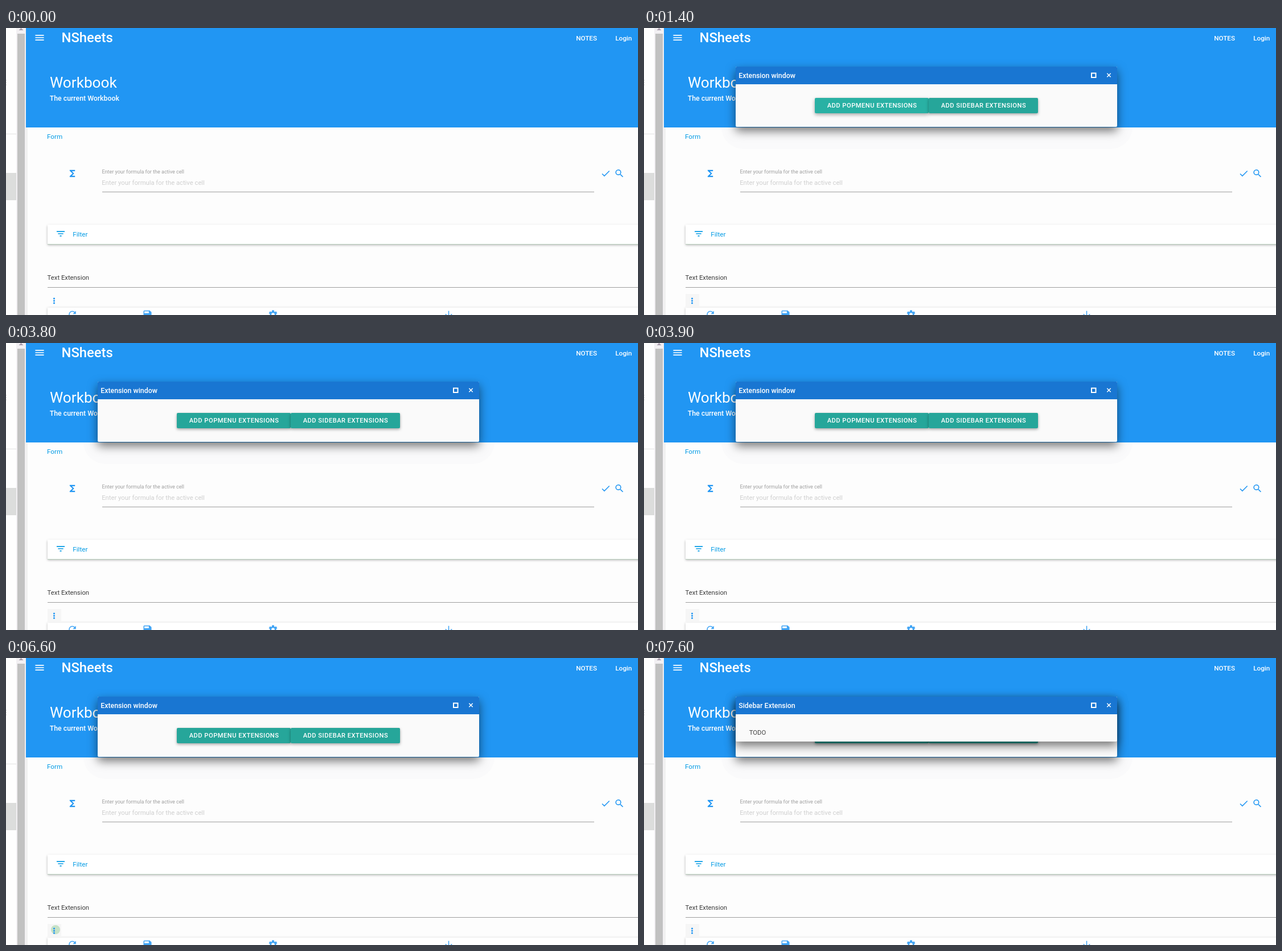
Animation of 1110 by 505 pixels, one loop 8000 ms. Source, as an HTML page with a canvas:

```html
<!DOCTYPE html>
<html lang="en">
<head>
<meta charset="utf-8">
<title>Workbook extensions</title>
<style>
html, body { margin: 0; width: 100%; height: 100%; overflow: hidden; background: #fdfdfd; }
canvas { display: block; }
</style>
</head>
<body>
<canvas id="stage" width="1110" height="505"></canvas>
<script>
const ctx = document.getElementById('stage').getContext('2d');
const LOOP = 8000;
const BLUE = '#2196f3', LIGHT_BLUE = '#42a5f5', LINK = '#039be5', WHITE = '#fff';

// Icon outlines on a 24 unit grid
const ICONS = {
  menu: 'M3 18h18v-2H3v2zm0-5h18v-2H3v2zm0-7v2h18V6H3z',
  sigma: 'M18 4H6v2l6.5 6L6 18v2h12v-3h-7l5-5-5-5h7z',
  check: 'M9 16.17L4.83 12l-1.42 1.41L9 19 21 7l-1.41-1.41z',
  search: 'M15.5 14h-.79l-.28-.27A6.5 6.5 0 1 0 13.73 14.43l.27.28v.79l5 4.99L20.49 19zM9.5 14a4.5 4.5 0 1 1 0-9 4.5 4.5 0 0 1 0 9z',
  filter: 'M10 18h4v-2h-4v2zM3 6v2h18V6H3zm3 7h12v-2H6v2z',
  refresh: 'M17.65 6.35A8 8 0 1 0 19.73 14h-2.08A6 6 0 1 1 16.22 7.78L13 11h7V4z',
  save: 'M17 3H5a2 2 0 0 0-2 2v14a2 2 0 0 0 2 2h14a2 2 0 0 0 2-2V7zM15 9H5V5h10z',
  down: 'M20 12l-1.41-1.41L13 16.17V4h-2v12.17l-5.58-5.59L4 12l8 8z'
};
for (const name in ICONS) ICONS[name] = new Path2D(ICONS[name]);

function rect(x, y, w, h, color) {
  ctx.fillStyle = color;
  ctx.fillRect(x, y, w, h);
}

function roundRect(x, y, w, h, radii, color) {
  ctx.fillStyle = color;
  ctx.beginPath();
  ctx.roundRect(x, y, w, h, radii);
  ctx.fill();
}

function withShadow(offset, blur, alpha, draw) {
  ctx.save();
  ctx.shadowColor = `rgba(0,0,0,${alpha})`;
  ctx.shadowBlur = blur;
  ctx.shadowOffsetY = offset;
  draw();
  ctx.restore();
}

function text(label, x, y, size, color, weight = 400, spacing = 0) {
  ctx.font = `${weight} ${size}px Roboto, sans-serif`;
  ctx.letterSpacing = spacing + 'px';
  ctx.fillStyle = color;
  ctx.fillText(label, x, y);
}

function icon(name, cx, cy, color, scale = 0.78) {
  ctx.save();
  ctx.translate(cx, cy);
  ctx.scale(scale, scale);
  ctx.translate(-12, -12);
  ctx.fillStyle = color;
  ctx.fill(ICONS[name], 'evenodd');
  ctx.restore();
}

function gear(cx, cy, color) {
  ctx.save();
  ctx.translate(cx, cy);
  ctx.fillStyle = color;
  ctx.beginPath();
  ctx.arc(0, 0, 5.6, 0, 7);
  ctx.arc(0, 0, 2.8, 0, 7);
  ctx.fill('evenodd');
  for (let i = 0; i < 6; i++) {
    ctx.fillRect(-2, -7.4, 4, 3);
    ctx.rotate(Math.PI / 3);
  }
  ctx.restore();
}

function outerScrollbar() {
  rect(0, 0, 18, 505, '#fefefe');
  rect(0, 186, 18, 1, '#e3e3e3');
  rect(0, 255, 18, 48, '#dcdddc');
  for (let y = 91; y < 103; y += 4) rect(0, y, 1, 2, '#dddddd');
  rect(18, 0, 17, 505, '#f2f0f3');
  rect(20, 10, 13, 495, '#c1c1c1');
  ctx.fillStyle = '#a79bab';
  ctx.beginPath();
  ctx.moveTo(22.5, 4);
  ctx.lineTo(26.5, 0);
  ctx.lineTo(30.5, 4);
  ctx.fill();
  rect(35, 175, 3, 330, '#f1f1f1');
}

function header() {
  rect(35, 0, 1075, 175, BLUE);
  icon('menu', 59, 17, WHITE, 0.84);
  text('NSheets', 97.5, 25, 23.8, WHITE, 500);
  text('NOTES', 1001.3, 22, 11.7, WHITE, 500);
  text('Login', 1070.2, 22, 11.7, WHITE, 500);
  text('Workbook', 77, 105, 26.2, WHITE);
  text('The current Workbook', 76.8, 128, 12.3, WHITE, 500);
}

function moreButton(t) {
  ctx.save();
  ctx.beginPath();
  ctx.rect(73, 468, 24, 23);
  ctx.clip();
  if (t >= 600) rect(73, 468, 24, 24, '#f6f6f6');
  ripple(t, 500, 81, 479, 7);
  ripple(t, 6600, 87, 478, 8);
  ctx.restore();
  for (let y = 476; y < 486; y += 4) {
    ctx.fillStyle = BLUE;
    ctx.beginPath();
    ctx.arc(84.5, y, 1.6, 0, 7);
    ctx.fill();
  }
}

function ripple(t, start, x, y, radius) {
  const age = Math.floor((t - start) / 100) / 5;
  if (age < 0 || age >= 1) return;
  ctx.fillStyle = `rgba(76,175,80,${0.28 * (1 - age)})`;
  ctx.beginPath();
  ctx.arc(x, y, radius + 22 * age, 0, 7);
  ctx.fill();
}

function sheetForm(t) {
  text('Form', 72, 195, 11.7, LINK);
  icon('sigma', 116.5, 256, BLUE);
  text('Enter your formula for the active cell', 168.4, 256, 9, '#9e9e9e');
  text('Enter your formula for the active cell', 168.2, 276, 11.25, '#cfcfcf');
  rect(169, 288, 864, 1, '#9e9e9e');
  icon('check', 1053.2, 256, BLUE);
  icon('search', 1077.4, 256, BLUE);

  withShadow(2, 4, 0.3, () => rect(73, 346, 1060, 34, WHITE));
  rect(73, 380, 1037, 1, '#b9cfbd');
  icon('filter', 96, 362, LINK);
  text('Filter', 117.3, 367, 11.7, LINK);

  text('Text Extension', 72.6, 443, 11.3, '#3a3a3a');
  rect(73, 456, 1037, 1, '#9e9e9e');

  withShadow(1, 4, 0.25, () => rect(73, 492, 1060, 40, WHITE));
  moreButton(t);
  icon('refresh', 116.5, 504, LIGHT_BLUE);
  icon('save', 248.5, 504, LIGHT_BLUE);
  gear(469, 504, LIGHT_BLUE);
  icon('down', 777.5, 504, LIGHT_BLUE);
}

function dialog(title, bottom) {
  withShadow(7, 17, 0.55, () => roundRect(161, 68, 670, bottom - 68, 2, '#fafafa'));
  roundRect(161, 68, 670, 31, [2, 2, 0, 0], '#1976d2');
  text(title, 166.2, 88, 12.35, WHITE, 500);
  ctx.strokeStyle = WHITE;
  ctx.lineWidth = 2;
  ctx.strokeRect(786, 79.5, 7.5, 7.5);
  ctx.lineWidth = 1.5;
  ctx.beginPath();
  ctx.moveTo(813.3, 79.8);
  ctx.lineTo(819.7, 86.2);
  ctx.moveTo(819.7, 79.8);
  ctx.lineTo(813.3, 86.2);
  ctx.stroke();
}

function button(label, x, width, hover = 0) {
  const mix = (from, to) => from + (to - from) * hover;
  const color = `rgb(${mix(38, 43)},${mix(166, 187)},${mix(154, 173)})`;
  withShadow(mix(2, 3), mix(5, 7), 0.35, () => roundRect(x, 123, width, 27, 2, color));
  text(label, x + 21.7, 140, 11.2, WHITE, 500, 0.45);
}

function extensionWindow(hover) {
  dialog('Extension window', 174);
  button('ADD POPMENU EXTENSIONS', 300, 200, hover);
  button('ADD SIDEBAR EXTENSIONS', 500, 192);
}

function popup(title) {
  dialog(title, 147);
  text('TODO', 184.7, 135, 11.25, '#424242');
}

function draw(t) {
  const between = (from, to) => t >= from && t < to;
  const open = between(500, 5600) || t >= 6600;
  rect(0, 0, 1110, 505, '#fdfdfd');
  outerScrollbar();
  if (t >= 500) roundRect(136, 135, 722, 78, 44, open ? '#fafafb' : '#f8f8ff');
  header();
  sheetForm(t);
  if (open) {
    const hover = between(1400, 1500) ? 0.5 : between(1500, 3800) ? 1 : 0;
    extensionWindow(hover);
  }
  if (between(1900, 3800)) popup('Popup Extension');
  if (t >= 7500) popup('Sidebar Extension');
}

const start = performance.now();
function frame() {
  draw((performance.now() - start) % LOOP);
  requestAnimationFrame(frame);
}
frame();
</script>
</body>
</html>
```
